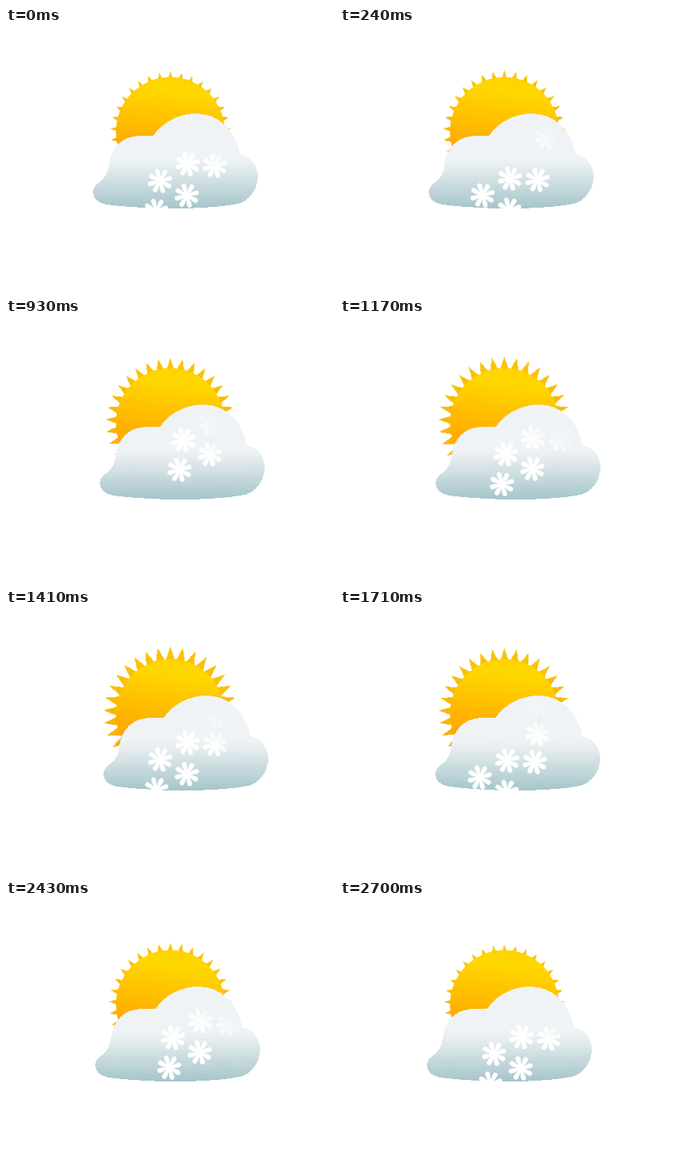
Recreate the animation shown at these times as an HTML page. Size 430x344 px, loop 2730 ms.

```html
<!DOCTYPE html>
<html lang="en">
<head>
<meta charset="utf-8">
<title>Sun, cloud and snow</title>
<style>
  html, body { margin: 0; width: 100%; height: 100%; overflow: hidden; background: #fff; }
  svg { display: block; width: 430px; height: 344px; }
  #rays, #cloud, .fall { animation: 2.73s linear infinite; }
  #rays { transform-origin: 215.5px 135.5px; animation-name: pulse; }
  #cloud { animation-name: drift; }
  #fallA { animation-name: fallA; }
  #fallB { animation-name: fallB; }

  @keyframes pulse {
    0%, 98.9%, 100% { transform: scale(.895); }
    52.7% { transform: scale(1); }
  }
  @keyframes drift {
    0%, 98.9%, 100% { transform: translateX(0); }
    52.7% { transform: translateX(14px); }
  }
  @keyframes fallA {
    0%, 98.9%, 100% { transform: translate(0, 0); }
    49.45% { transform: translate(-85px, 105.3px); }
    49.46% { transform: translate(85px, -105.3px); }
  }
  @keyframes fallB {
    0% { transform: translate(89px, -114.4px); }
    98.9%, 100% { transform: translate(-81px, 96.2px); }
  }
</style>
</head>
<body>
<svg viewBox="0 0 430 344">
  <defs>
    <linearGradient id="sunFill" gradientUnits="userSpaceOnUse" x1="222" y1="62" x2="208" y2="172">
      <stop offset="0" stop-color="#ffd000"/>
      <stop offset=".17" stop-color="#ffd800"/>
      <stop offset="1" stop-color="#ffa400"/>
    </linearGradient>
    <linearGradient id="rayFill" gradientUnits="userSpaceOnUse" x1="215" y1="48" x2="215" y2="190">
      <stop offset="0" stop-color="#f9c606"/>
      <stop offset="1" stop-color="#f8ae08"/>
    </linearGradient>
    <linearGradient id="cloudFill" gradientUnits="userSpaceOnUse" x1="0" y1="112" x2="0" y2="236">
      <stop offset=".46" stop-color="#eff3f6"/>
      <stop offset=".54" stop-color="#e9eff0"/>
      <stop offset="1" stop-color="#a5c5cb"/>
    </linearGradient>
    <linearGradient id="fade" gradientUnits="userSpaceOnUse" x1="302.2" y1="146.4" x2="271.9" y2="183.8">
      <stop offset="0" stop-color="#000"/>
      <stop offset="1" stop-color="#fff"/>
    </linearGradient>
    <mask id="veil" maskUnits="userSpaceOnUse" x="0" y="0" width="430" height="344">
      <rect width="430" height="344" fill="url(#fade)"/>
    </mask>
    <path id="petal" d="M0 0C-1.8-5-3.4-9-3.1-13.2A3.1 3.1 0 0 1 3.1-13.2C3.4-9 1.8-5 0 0Z"/>
    <g id="flake" fill="#fff"><circle r="6"/></g>
    <g id="flurry">
      <use href="#flake" x="274" y="180"/>
      <use href="#flake" x="238" y="178"/>
      <use href="#flake" x="202" y="200"/>
      <use href="#flake" x="237" y="219"/>
      <use href="#flake" x="197" y="239"/>
    </g>
  </defs>

  <polygon id="rays" fill="url(#rayFill)" shape-rendering="crispEdges"/>
  <circle cx="215.5" cy="135.5" r="71.3" fill="url(#sunFill)"/>
  <path id="cloud" fill="url(#cloudFill)" shape-rendering="crispEdges" d="M193 141C205 123 226 112 250 112
    C279 112 302 135 306.5 165C320 167 330 180 330 194C330 212 318 226 305 229.5
    C285 234 250 236 220 236C185 236 150 233.5 130 230.5C120 229 114 222 114 215
    C114 208 118 204 123 201.5C131 196 134 187 135 178C137 157 152 141 176 141Z"/>
  <g mask="url(#veil)">
    <g id="fallA" class="fall"><use href="#flurry"/></g>
    <g id="fallB" class="fall"><use href="#flurry"/></g>
  </g>
</svg>
<script>
  const RAYS = 33, PETALS = 8, TILT = -16;

  const star = Array.from({ length: RAYS * 2 }, (_, i) => {
    const a = i * Math.PI / RAYS, r = i % 2 ? 68.5 : 88;
    return [215.5 + r * Math.sin(a), 135.5 - r * Math.cos(a)].map(v => v.toFixed(2));
  });
  document.getElementById('rays').setAttribute('points', star.join(' '));

  const flake = document.getElementById('flake');
  for (let i = 0; i < PETALS; i++) {
    const petal = document.createElementNS('http://www.w3.org/2000/svg', 'use');
    petal.setAttribute('href', '#petal');
    petal.setAttribute('transform', `rotate(${TILT + i * 360 / PETALS})`);
    flake.append(petal);
  }
</script>
</body>
</html>
```
